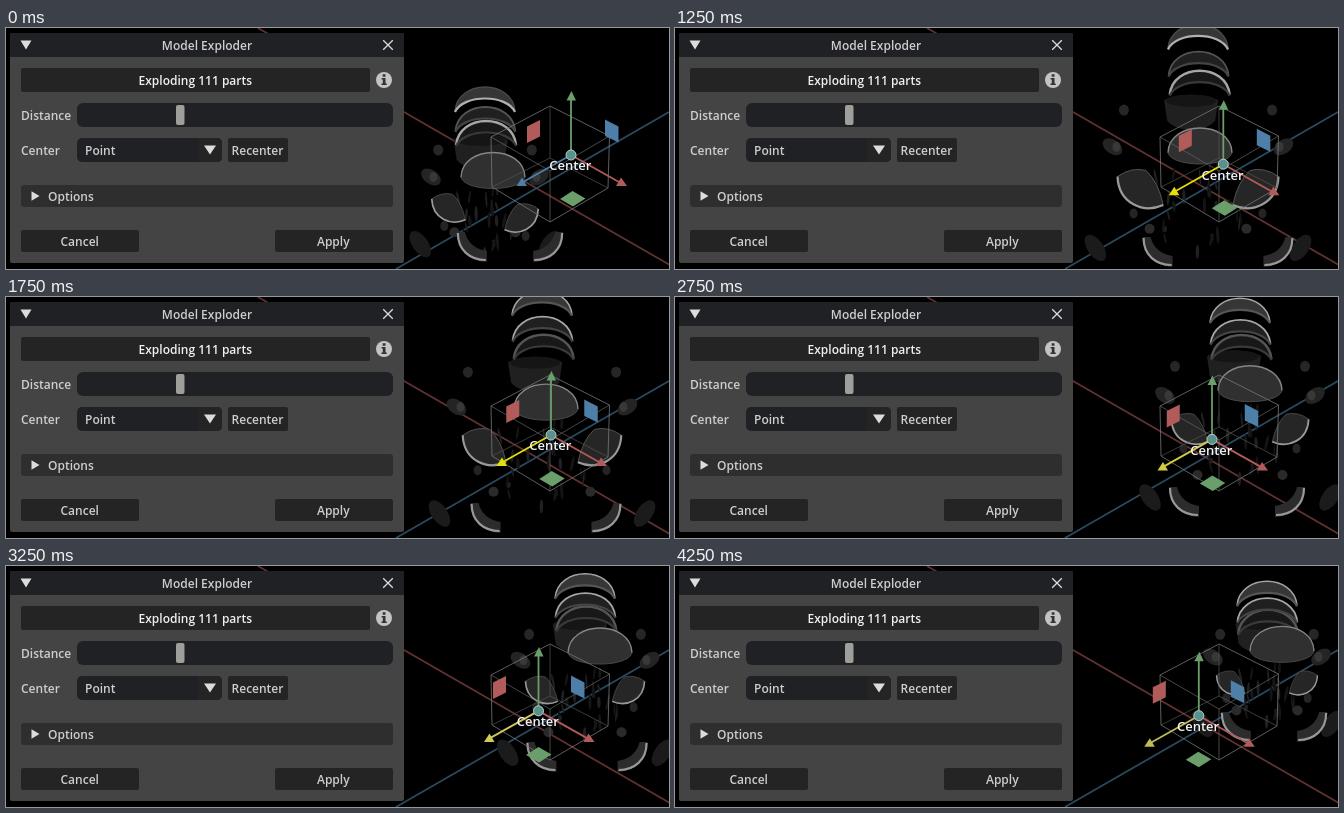
Recreate the animation shown at these times as an HTML page with a canvas. Size 663x241 px, loop 5.75 s.

```html
<!DOCTYPE html>
<html lang="en">
<head>
<meta charset="utf-8">
<title>Model Exploder</title>
<style>
  html, body { margin: 0; width: 663px; height: 241px; overflow: hidden; background: #000; }
  canvas, svg { position: absolute; left: 0; top: 0; display: block; }
  text { font: 600 12px "Open Sans", "Noto Sans", sans-serif; fill: #cecece; }
  .mid { text-anchor: middle; }
  .field { fill: #1f2124; }
  .button { fill: #242424; }
  .icon { fill: #dcdcdc; }
</style>
</head>
<body>
<canvas id="view" width="663" height="241"></canvas>
<svg width="663" height="241" viewBox="0 0 663 241">
  <rect x="4" y="5" width="394" height="230" rx="2" fill="#444"/>
  <path d="M4 29V7q0-2 2-2H396q2 0 2 2V29Z" fill="#1f2124"/>
  <path class="icon" d="M14.5 12.5H25.5L20 21.5Z"/>
  <text class="mid" x="201" y="22">Model Exploder</text>
  <path d="M377.2 12.2L386.8 21.8M386.8 12.2L377.2 21.8" stroke="#dcdcdc" stroke-width="1.3"/>

  <rect class="button" x="15" y="40" width="349" height="24" rx="2"/>
  <text class="mid" x="189.3" y="57" style="fill:#f0f0f0">Exploding 111 parts</text>
  <circle cx="378" cy="52" r="8" fill="#c4c4c4"/>
  <path d="M376.7 46.2h2.8v2.5h-2.8ZM375.6 50h3.9v5.5h1.2v1.6h-5.2v-1.6h1.3v-3.9h-1.2Z" fill="#333"/>

  <text x="15" y="92">Distance</text>
  <rect class="field" x="71" y="75" width="316" height="24" rx="6"/>
  <rect x="170" y="77" width="8.5" height="20" rx="2" fill="#9e9e9a"/>

  <text x="15" y="127">Center</text>
  <rect class="field" x="71" y="110" width="145" height="24" rx="5"/>
  <path class="button" d="M192 110h19q5 0 5 5v14q0 5-5 5h-19Z"/>
  <path class="icon" d="M198 117.5H210L204 126.5Z"/>
  <text x="79" y="127">Point</text>
  <rect class="button" x="222" y="110" width="60" height="24" rx="2"/>
  <text class="mid" x="251.5" y="127">Recenter</text>

  <rect x="15" y="157" width="372" height="22" rx="3" fill="#2e2e2e"/>
  <path class="icon" d="M25.5 163.3V172.7L33.5 168Z"/>
  <text x="42" y="173">Options</text>

  <rect class="button" x="15" y="202" width="118" height="22" rx="2"/>
  <text class="mid" x="73.7" y="218">Cancel</text>
  <rect class="button" x="269" y="202" width="118" height="22" rx="2"/>
  <text class="mid" x="327.3" y="218">Apply</text>
</svg>
<script>
const LOOP = 5750, HOLD = 750, STEP = 500;
const ctx = document.getElementById('view').getContext('2d');

// handle x, model x, model y, half width, lift, drop, dome shift, jaw shift, skew, third axis
const steps = [
  [565, 479, 180, 36, 1.00, 38, 8, 25, 10, '#4d7fa8'],
  [557.3, 494, 171, 49, 1.16, 47, 3, 16, 21, '#a8a54c'],
  [548.3, 523, 161, 57, 1.36, 62, 2, 20, 0, '#e6de06'],
  [545, 536, 150, 57, 1.29, 70, 4, 4, 0, '#e6de06'],
  [542, 551, 140, 56, 1.20, 78, 6, -9, 0, '#e2d810'],
  [537, 565, 132, 50, 1.08, 72, 10, -3, 0, '#d4cc40'],
  [532.5, 579, 124, 43, 0.96, 66, 15, 2, 0, '#d0c95c'],
  [528, 586, 120, 39, 0.90, 54, 15, 4, 0, '#c6c158'],
  [523.8, 592, 117, 36, 0.84, 43, 15, 7, 0, '#c0bb55'],
];

const RED = '#b25b5b', GREEN = '#6a9f6b', BLUE = '#4d7fa8';

function paint(path, fill, stroke, width = 1) {
  const p = new Path2D(path);
  if (fill) { ctx.fillStyle = fill; ctx.fill(p); }
  if (stroke) { ctx.strokeStyle = stroke; ctx.lineWidth = width; ctx.stroke(p); }
}

function at(x, y, sx, sy, draw) {
  ctx.save();
  ctx.translate(x, y);
  ctx.scale(sx, sy);
  draw();
  ctx.restore();
}

function blob(x, y, rx, ry, tilt, fill) {
  ctx.beginPath();
  ctx.ellipse(x, y, rx, ry, tilt, 0, 7);
  ctx.fillStyle = fill;
  ctx.fill();
}

function random(seed) {
  return () => (seed = seed * 16807 % 2147483647) / 2147483647;
}

function cap(x, y, fill, top, rim, width = 1.5) {
  at(x, y, 1, 1, () => {
    paint('M-30 25C-27-8 27-8 30 25C22 7-22 7-30 25Z', fill);
    paint('M-30 24C-27-8 27-8 30 24', null, top, width);
    paint('M-30 25C-22 7 22 7 30 25', null, rim, 2.2);
  });
}

function model(i) {
  const [, ox, oy, half, lift, drop, domeX, jawX, skew] = steps[i];
  const px = x => ox + x * half, py = y => oy + y * lift;
  const near = i < 3;

  // loose inner pieces
  const rnd = random(77);
  for (let n = 0; n < 26; n++) {
    const x = px((rnd() - 0.5) * 1.5), y = py(rnd() * 65 - 18);
    blob(x, y, 0.8 + rnd(), 3 + rnd() * 6, (rnd() - 0.5) * 0.5, rnd() < 0.5 ? '#151515' : '#202020');
  }

  for (const side of [-1, 1]) {
    const low = side > 0 ? skew : 0, size = lift / 1.1;
    blob(px(side * 1.3), py(-58), 5, 5.5, 0, '#262626');
    blob(px(side * 1.5), py(-31), 11, 7, side * -0.6, '#242424');
    blob(px(side * 1.43), py(-31), 4, 5, 0, '#383838');
    blob(px(side * 1.13), py(18) + low, 4, 5, 0, '#242424');
    blob(px(side * 0.85), oy + drop * 0.64, 5, 5, 0, '#2a2a2a');
    blob(px(side * 1.8), oy + drop * 0.95, 8, 15, side * 0.6, '#1b1b1b');

    at(px(side), oy + low, -side * size, size, () => {
      paint('M-19-10Q-8-18 4-15Q14-6 18 13C2 20-18 12-19-10Z', '#262626', '#555', 0.8);
      paint('M-19-10C-18 12 2 20 18 13', null, '#9a9a9a', 1.8);
    });
    at(px(side * 1.06) + jawX, oy + drop, -side, 1, () => {
      paint('M-15-14C-15 4-2 15 15 16L15 5Q-3 2-7-14Z', '#2c2c2c');
      paint('M-14-13C-14 4-2 14 14 14', null, '#999', 2.2);
    });
  }

  at(px(-0.12), py(-56), 1, 1, () => {
    paint('M-27-12C-20-20 20-20 27-12L24 8C14 20-14 20-24 8Z', '#202020');
    blob(0, -12, 25, 6, 0, '#151515');
  });
  cap(px(0.03), py(-87), '#181818', near ? '#a6a6a6' : '#555', '#3a3a3a', 2.4);
  cap(px(0.01), py(-101), '#202020', near ? '#555' : '#a6a6a6', '#444', 1.8);
  cap(px(0), py(-121), '#363636', near ? '#4a4a4a' : '#a6a6a6', near ? '#b0b0b0' : '#555');

  at(ox + domeX, oy - 27 - drop * 0.23, 1, 1, () => {
    paint('M-32 5C-31-28 31-28 32 5C28 20-28 20-32 5Z', '#303030');
    paint('M-32 5C-31-28 31-28 32 5', null, '#858585', 1.4);
    paint('M-32 5C-28 20 28 20 32 5', null, '#4c4c4c', 0.9);
  });
}

function gizmo(i) {
  const shift = 1 - i / 4;
  const x = steps[i][0], y = 127 + (565 - x) * 0.55, axis = steps[i].at(-1);
  at(x, y, 1, 1, () => {
    paint('M0 0V-56', null, GREEN, 1.8);
    paint('M0 0L48 27', null, RED, 1.8);
    paint('M0 0L-48 27', null, axis, 1.8);
    paint('M0.5-64L5-54.5H-4.5Z', GREEN);
    paint('M45 31L50 22.5L56 31Z', RED);
    paint('M-44 31L-49 22.5L-54.5 31Z', axis);
  });
  at(x + shift, y, 1, 1, () => {
    paint('M-45-28.5L-32-35V-18.5L-45-12Z', RED);
    paint('M33-35.5L46.5-28.5L46.5-12.5L33-19Z', BLUE);
    paint('M-12 44L0.5 36L13.5 43.5L1 51.5Z', GREEN);
  });
  paint(`M${x - 5} ${y}a5 5 0 1 0 10 0a5 5 0 1 0-10 0Z`, '#5a918c', '#b4cfcb', 1);
  ctx.font = '600 13px "Open Sans", "Noto Sans", sans-serif';
  ctx.textAlign = 'center';
  ctx.fillStyle = '#f4f4f4';
  ctx.fillText('Center', x - 0.7, y + 15.4);
}

function draw(i) {
  ctx.fillStyle = '#000';
  ctx.fillRect(0, 0, 663, 241);
  paint('M252 0L671 241', null, '#633232', 1.7);
  paint('M390 241L663 84', null, '#2b4b60', 1.7);
  model(i);
  paint('M544 78L603.5 108L602 160L544 194L486 159L485 109Z', null, '#777', 0.8);
  paint('M485 109L544 143L603.5 108M544 143V194', null, '#666', 0.7);
  paint('M486 159L544 130L602 160M544 130V78', null, '#555', 0.7);
  gizmo(i);
}

const begin = performance.now();
let shown = -1;

function frame() {
  const t = (performance.now() - begin) % LOOP;
  const i = t < HOLD ? 0 : Math.min(steps.length - 1, 1 + Math.floor((t - HOLD) / STEP));
  if (i !== shown) draw(shown = i);
  requestAnimationFrame(frame);
}
frame();
</script>
</body>
</html>
```
